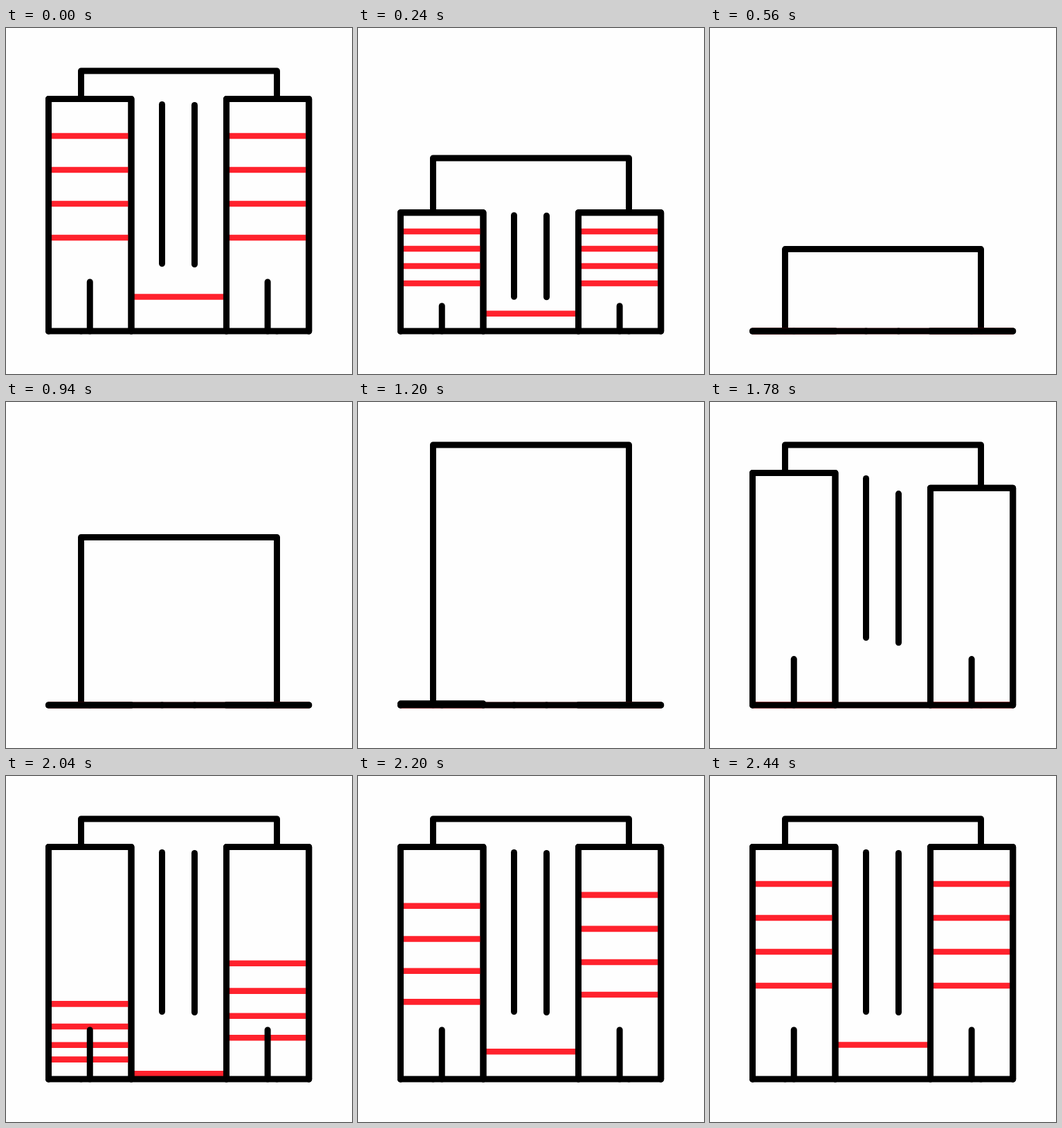
Recreate the animation shown at these times as an HTML page with a canvas. Size 500 by 500 pixels, loop 3 s.

```html
<!DOCTYPE html>
<html lang="en">
<head>
<meta charset="utf-8">
<title>Building</title>
<style>
  html, body { margin: 0; width: 100%; height: 100%; overflow: hidden; background: #fefefe; }
  canvas { display: block; width: 100vmin; height: 100vmin; }
</style>
</head>
<body>
<canvas id="stage" width="500" height="500"></canvas>
<script>
const ctx = document.getElementById('stage').getContext('2d');
const LOOP = 3000, BASE = 438, LOW_HALL = 0.315;
const PAPER = '#fefefe', INK = '#000', RED = '#ff222d';

function bezier(x1, y1, x2, y2) {
  const at = (s, a, b) => 3 * s * (1 - s) * ((1 - s) * a + s * b) + s ** 3;
  return x => {
    if (x <= 0) return 0;
    if (x >= 1) return 1;
    let lo = 0, hi = 1;
    for (let i = 0; i < 30; i++) {
      const mid = (lo + hi) / 2;
      if (at(mid, x1, x2) < x) lo = mid; else hi = mid;
    }
    return at(lo, y1, y2);
  };
}
const fall = bezier(0.36, 0, 0.47, 1);
const ease = bezier(0.25, 0.1, 0.25, 1);

// Height factor: everything sinks together, then each part rises on its own.
const heightAt = (t, start, duration) =>
  t < 840 ? 1 - fall(t / 560) : ease((t - start) / duration);

const lift = (y, k) => BASE - (BASE - y) * k;

function stroke(points, color = INK, width = 9, fill) {
  ctx.beginPath();
  points.forEach(([x, y]) => ctx.lineTo(x, y));
  if (fill) {
    ctx.fillStyle = fill;
    ctx.fill();
  }
  ctx.strokeStyle = color;
  ctx.lineWidth = width;
  ctx.stroke();
}

const box = (left, right, top, fill) =>
  stroke([[left, BASE], [left, top], [right, top], [right, BASE]], INK, 9, fill);

const bar = (x, top, bottom, k) =>
  stroke([[x, lift(top, k)], [x, lift(bottom, k)]]);

function stripe(left, right, y, order, t) {
  const h = lift(y, heightAt(t, 1890 + order * 11.4, 440));
  ctx.lineCap = 'butt';
  stroke([[left, h], [right, h]], RED, 8.6);
  ctx.lineCap = 'round';
}

function tower(left, right, k, firstOrder, doorK, t) {
  const top = lift(102.5, k), door = (left + right) / 2;
  box(left, right, top, PAPER);
  for (let i = 0; i < 4; i++) stripe(left, right, 156 + 49 * i, firstOrder + i, t);
  box(left, right, top);
  bar(door, 367, BASE, doorK);
}

function draw(t) {
  ctx.fillStyle = PAPER;
  ctx.fillRect(0, 0, 500, 500);
  ctx.lineCap = ctx.lineJoin = 'round';

  const hall = LOW_HALL + (1 - LOW_HALL) * heightAt(t, 840, 355);
  const late = heightAt(t, 1485, 430);
  box(108.5, 391.5, lift(62, hall));
  stripe(181, 318.5, 388.5, 8, t);
  bar(225.5, 110.5, 340.5, heightAt(t, 1330, 380));
  bar(272.5, 111.5, 341.5, late);
  tower(61.5, 181, heightAt(t, 1196, 400), 4, late, t);
  tower(318.5, 437.7, late, 0, late, t);
  stroke([[61.5, BASE], [437.7, BASE]]);
}

function tick() {
  draw(performance.now() % LOOP);
  requestAnimationFrame(tick);
}
tick();
</script>
</body>
</html>
```
